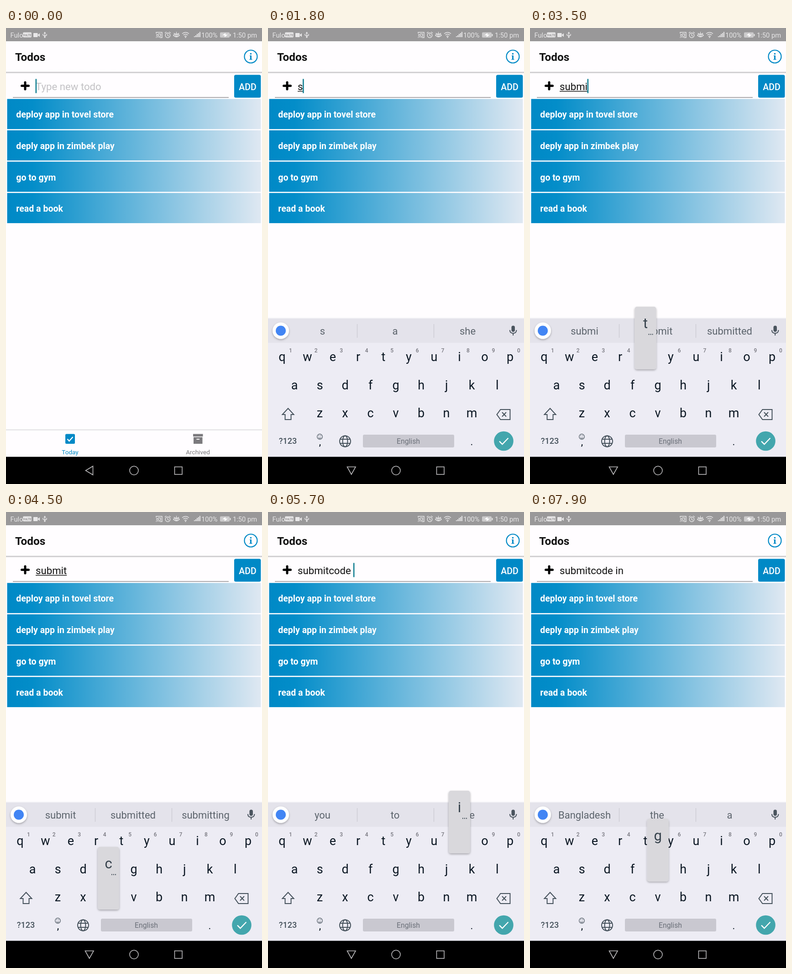
Recreate the animation shown at these times as an HTML page. Size 561x998 px, loop 8 s.

```html
<!DOCTYPE html>
<html lang="en">
<head>
<meta charset="utf-8">
<title>Todos</title>
<style>
  html, body { margin: 0; width: 100%; height: 100%; overflow: hidden; background: #fffdff; }
  svg { display: block; width: 561px; height: 998px; font-family: Roboto, "Noto Sans", sans-serif; }
  text { white-space: pre; }
  .mid { text-anchor: middle; }
  .line { fill: none; stroke-width: 1.6; }
</style>
</head>
<body>
<svg id="stage" viewBox="0 0 561 998" xmlns="http://www.w3.org/2000/svg">
  <defs>
    <linearGradient id="row">
      <stop offset="0" stop-color="#0089c6"/>
      <stop offset=".1" stop-color="#038dc9"/>
      <stop offset="1" stop-color="#dfe8f2"/>
    </linearGradient>
    <linearGradient id="shade" x2="0" y2="1">
      <stop offset="0" stop-color="#b9b8ba"/>
      <stop offset="1" stop-color="#fffdff"/>
    </linearGradient>
    <filter id="drop" x="-30%" y="-30%" width="160%" height="160%">
      <feDropShadow dx="0" dy="2" stdDeviation="2" flood-opacity=".3"/>
    </filter>
  </defs>
  <rect width="561" height="998" fill="#fffdff"/>

  <!-- status bar -->
  <rect width="561" height="29" fill="#999899"/>
  <g fill="#e8e7e8" font-size="14.7">
    <text x="9.5" y="20.5">Fulo</text>
    <text x="428" y="20.5">100%</text>
    <text x="497" y="20.5">1:50 pm</text>
    <rect x="37" y="9.500" width="19" height="11" rx="2"/>
    <text x="46.500" y="17.500" class="mid" font-size="6.500" font-weight="700" fill="#999899">VoLTE</text>
    <rect x="60" y="11" width="9.500" height="9" rx="1"/>
    <path d="M69 15.500L74 11.500V19.500Z"/>
    <circle cx="85" cy="20" r="1.700"/>
    <path d="M85 8L87.500 12H82.500Z"/>
    <path d="M412 20v-2h2v2zM415 20v-4h2v4zM418 20v-7h2v7zM421 20v-9h2v9zM424 20V8.500h2V20z"/>
    <rect x="469" y="9.500" width="21" height="11.500" rx="2" opacity=".65"/>
    <rect x="490.500" y="13" width="2" height="5"/>
    <path d="M474 16L481 11V14.500H486L479 20V16Z" fill="#fff"/>
    <g fill="none" stroke="#e8e7e8" stroke-width="1.400">
      <path d="M85 10V20M81 13V15.500L85 18L89 16V13"/>
      <path d="M329 12V9.500H342V21H337M329 14a7 7 0 0 1 7 7M329 17a4 4 0 0 1 4 4M333 13H339V18H337"/>
      <circle cx="354.500" cy="16" r="5.200"/>
      <path d="M354.500 12.500V16.500L357 18M348 11L351.500 8.500M361 11L357.500 8.500"/>
      <path d="M367 16Q373.500 9 380 16Q373.500 23 367 16ZM368 11L369.500 13M373.500 8.500V11M379 11L377.500 13"/>
      <circle cx="373.500" cy="16" r="2"/>
      <path d="M386 12.500Q393.500 6.500 401 12.500M388.500 15.500Q393.500 11.500 398.500 15.500M391 18.500Q393.500 16.500 396 18.500"/>
    </g>
    <circle cx="329.500" cy="20.500" r="1"/><circle cx="393.500" cy="20.500" r="1.300"/>
  </g>

  <!-- header and entry row -->
  <rect y="96" width="561" height="4" fill="url(#shade)"/>
  <text x="20" y="71.500" font-size="24.300" font-weight="700" fill="#111">Todos</text>
  <circle cx="536.500" cy="62.500" r="14" fill="none" stroke="#0089c6" stroke-width="2.200"/>
  <path d="M534 60h4v8h1.500v1.500h-6V68h1.500v-6.500h-1z" fill="#0089c6"/>
  <circle cx="536.500" cy="56.500" r="1.800" fill="#0089c6"/>
  <path d="M42 119V134M34.500 126.500H49.500" stroke="#000" stroke-width="5" stroke-linecap="round"/>
  <path d="M15 152H488" stroke="#929193" stroke-width="1.500"/>
  <text id="hint" x="65" y="136" font-size="22.200" fill="#c3c2c5">Type new todo</text>
  <text id="entry" x="65" y="136" font-size="22.200" fill="#111"></text>
  <path id="underline" stroke="#111" stroke-width="1.400"/>
  <rect id="caret" y="111.500" width="2.700" height="31" fill="#168294"/>
  <rect x="500" y="102.500" width="58.500" height="50" rx="3.500" fill="#0089c6"/>
  <text x="529.500" y="135.500" class="mid" font-size="19.600" font-weight="500" fill="#fff">ADD</text>
  <g id="todos"></g>

  <!-- tab bar and navigation -->
  <g id="tabs" class="mid" font-size="13.600">
    <path d="M0 879.500H561" stroke="#d6d5d8" stroke-width="1.300"/>
    <rect x="130" y="888.500" width="21" height="21.500" rx="2.500" fill="#0089c6"/>
    <path d="M134.500 899.500L138.500 904L146.500 895" class="line" stroke="#fff" style="stroke-width:2.300"/>
    <text x="140.500" y="932.500" fill="#0089c6">Today</text>
    <path d="M410 888.500H431.500V894H410ZM411 895.500H430.500V910H411Z" fill="#7b7a7d"/>
    <path d="M417.500 900H424" stroke="#fff" stroke-width="2"/>
    <text x="420.500" y="932.500" fill="#7b7a7d">Archived</text>
  </g>
  <g id="keyboard"></g>
  <rect id="navBar" y="938.500" width="561" height="60" fill="#000"/>
  <g class="line" stroke="#bcbbbd">
    <path id="back"/>
    <circle cx="280.500" cy="968.500" r="9.500"/>
    <rect x="369.500" y="960.500" width="16.500" height="16.500"/>
  </g>
</svg>
<script>
const $ = id => document.getElementById(id);
const LOOP = 8000, STEP = 100;
const ROWS = [
  { keys: 'qwertyuiop', x: 31, y: 729 },
  { keys: 'asdfghjkl', x: 58.2, y: 790.5 },
  { keys: 'zxcvbnm', x: 113.5, y: 852 }
];
const PITCH = 55.5;
const ALTERNATES = 'qwertyuiopascnl';

// [start, text, suggestions]
const TYPING = [
  [0, '', 'I hi dear'],
  [1800, 's', 's a she'],
  [2100, 'su', 'su sure sun'],
  [2700, 'sub', 'sub subscribe sun'],
  [3000, 'subm', 'subm submit submitted'],
  [3300, 'submi', 'submi submit submitted'],
  [3700, 'submit', 'submit submitted submitting'],
  [4600, 'submitc', 'submitc submit submitted'],
  [4900, 'submitco', 'submitco submit submitted'],
  [5100, 'submitcod', 'submitcod submit submitted'],
  [5300, 'submitcode', 'submitcode submit submitted'],
  [5500, 'submitcode ', 'you to me'],
  [5800, 'submitcode i', 'i in is'],
  [6000, 'submitcode in', 'in into the'],
  [6200, 'submitcode in ', 'Bangladesh the a']
];
// [key, down, up]
const PRESSES = [
  ['s', 1700, 1800], ['u', 2000, 2100], ['b', 2600, 2700], ['m', 2900, 3000],
  ['i', 3200, 3300], ['t', 3500, 3700], ['c', 4400, 4600], ['o', 4800, 4900],
  ['d', 5000, 5100], ['e', 5200, 5300], [' ', 5400, 5500], ['i', 5700, 5800],
  ['n', 5900, 6000], [' ', 6100, 6200], ['g', 7900, 8000]
];
const CARET_OFF = [[100, 500], [1000, 1400], [2600, 2700], [4200, 4600], [6800, 7300], [7800, 8000]];

const label = (x, y, size, fill, body, extra = '') =>
  `<text x="${x}" y="${y}" font-size="${size}" fill="${fill}" class="mid" ${extra}>${body}</text>`;

function keyPlace(key) {
  const row = ROWS.find(r => r.keys.includes(key));
  return { x: row.x + row.keys.indexOf(key) * PITCH, y: row.y };
}

function buildTodos() {
  $('todos').innerHTML = ['deploy app in tovel store', 'deply app in zimbek play', 'go to gym', 'read a book']
    .map((name, i) => {
      const y = 155.3 + i * 68.6;
      return `<rect x="2.5" y="${y}" width="556" height="66" fill="url(#row)"/>
        <text x="22.300" y="${y + 41}" font-size="19.500" font-weight="700" fill="#fff">${name}</text>`;
    }).join('');
}

function buildKeyboard() {
  const keys = ROWS.map(r => [...r.keys].map((k, i) => label(r.x + i * PITCH, r.y, 27, '#0b1723', k)).join('')).join('');
  const digits = [...'1234567890'].map((d, i) => label(49.5 + i * 55.55, 710, 12, '#77777f', d, 'font-weight="500"')).join('');
  $('keyboard').innerHTML = `
    <rect y="634" width="561" height="3" fill="#f3f2f6"/>
    <rect y="636" width="561" height="400" fill="#edecf4"/>
    <rect y="636" width="561" height="53" fill="#e4e3eb"/>
    <path d="M195.500 648V678M363.500 648V678" stroke="#cbcad2" stroke-width="1.300"/>
    <circle cx="28" cy="662.500" r="18" fill="#fff" filter="url(#drop)"/>
    <circle cx="28" cy="662.500" r="11" fill="#4285f4"/>
    ${[119.5, 278.5, 437.5].map(x => label(x, 670.5, 22, '#5c646c', '', 'data-hint')).join('')}
    <rect x="533.500" y="651.500" width="7.500" height="13.500" rx="3.700" fill="#4a545e"/>
    <path d="M530 661Q530 668 537.200 668T544.500 661M537.200 668V673" class="line" stroke="#4a545e" style="stroke-width:2"/>
    ${keys}${digits}
    <g class="line" stroke="#46525c" style="stroke-width:2">
      <path d="M44 832.500L56.500 846H50.500V857H37.500V846H31.500Z"/>
      <path d="M509.500 835H530.500V857H509.500L501.500 846ZM513 841L522 850.500M522 841L513 850.500"/>
      <circle cx="169" cy="904.500" r="12"/>
      <ellipse cx="169" cy="904.500" rx="5.500" ry="12"/>
      <path d="M158 900H180M158 909H180"/>
    </g>
    <circle cx="113.500" cy="894.500" r="5.800" class="line" stroke="#46525c" style="stroke-width:1.200"/>
    <path d="M110.500 896.500Q113.500 899.500 116.500 896.500M111.500 891.500V893.500M115.500 891.500V893.500" class="line" stroke="#46525c" style="stroke-width:1.200"/>
    ${label(43.5, 910, 18, '#46525c', '?123', 'font-weight="500"')}
    ${label(114, 913, 20, '#0b1723', ',', 'font-weight="500"')}
    ${label(446.5, 913, 22, '#0b1723', '.')}
    <rect id="space" x="208" y="890" width="200" height="28" rx="3"/>
    ${label(307.5, 909.5, 15.8, '#6b7079', 'English')}
    <circle cx="516.500" cy="904" r="21.300" fill="#43a6ad"/>
    <path d="M507 904.500L513.500 911L526.500 897.500" class="line" stroke="#fff" style="stroke-width:2.300"/>
    <g id="popup">
      <rect x="-23.500" y="-119" width="47" height="137" rx="5" fill="#d9d8dc" filter="url(#drop)"/>
      ${label(0, -72, 31, '#36424c', '', 'id="popupKey"')}
      <path id="dots" d="M6.500 -58.500h2M10.500 -58.500h2M14.500 -58.500h2" stroke="#36424c" stroke-width="2"/>
    </g>`;
}

const show = (id, on) => $(id).setAttribute('display', on ? 'inline' : 'none');
const during = (t, from, to) => t >= from && t < to;

function drawEntry(t, text) {
  const entry = $('entry');
  entry.textContent = text;
  const width = text ? entry.getComputedTextLength() : 0;
  const wordStart = text.lastIndexOf(' ') + 1;
  const from = wordStart ? entry.getSubStringLength(0, wordStart) : 0;
  $('underline').setAttribute('d', `M${65 + from} 138.500H${65 + width}`);
  show('underline', wordStart < text.length);
  show('hint', !text);
  $('caret').setAttribute('x', 64.5 + width);
  show('caret', !CARET_OFF.some(([a, b]) => during(t, a, b)));
}

function drawKeyboard(t, suggestions) {
  show('keyboard', t >= 900);
  show('tabs', t < 900);
  show('navBar', !during(t, 900, 1000));
  $('keyboard').setAttribute('transform', `translate(0 ${t < 1000 ? 187 : 0})`);
  const words = suggestions.split(' ');
  document.querySelectorAll('[data-hint]').forEach((el, i) => { el.textContent = words[i]; });

  const press = PRESSES.find(([, a, b]) => during(t, a, b));
  const key = press ? press[0] : '';
  $('space').setAttribute('fill', key === ' ' ? '#b5b5be' : '#c9c8d0');
  const letter = key.trim();
  show('popup', letter);
  if (!letter) return;
  const { x, y } = keyPlace(letter);
  $('popup').setAttribute('transform', `translate(${x} ${y})`);
  $('popupKey').textContent = letter;
  show('dots', ALTERNATES.includes(letter));
}

function render(ms) {
  const t = Math.floor((ms % LOOP) / STEP) * STEP;
  const [, text, suggestions] = TYPING.filter(([start]) => start <= t).pop();
  drawEntry(t, text);
  drawKeyboard(t, suggestions);
  $('back').setAttribute('d', t < 700 ? 'M190.500 959V978L174.500 968.500Z' : 'M173.500 960.500H192L182.700 977Z');
}

buildTodos();
buildKeyboard();
const begin = performance.now();
function tick() {
  render(performance.now() - begin);
  requestAnimationFrame(tick);
}
tick();
</script>
</body>
</html>
```
